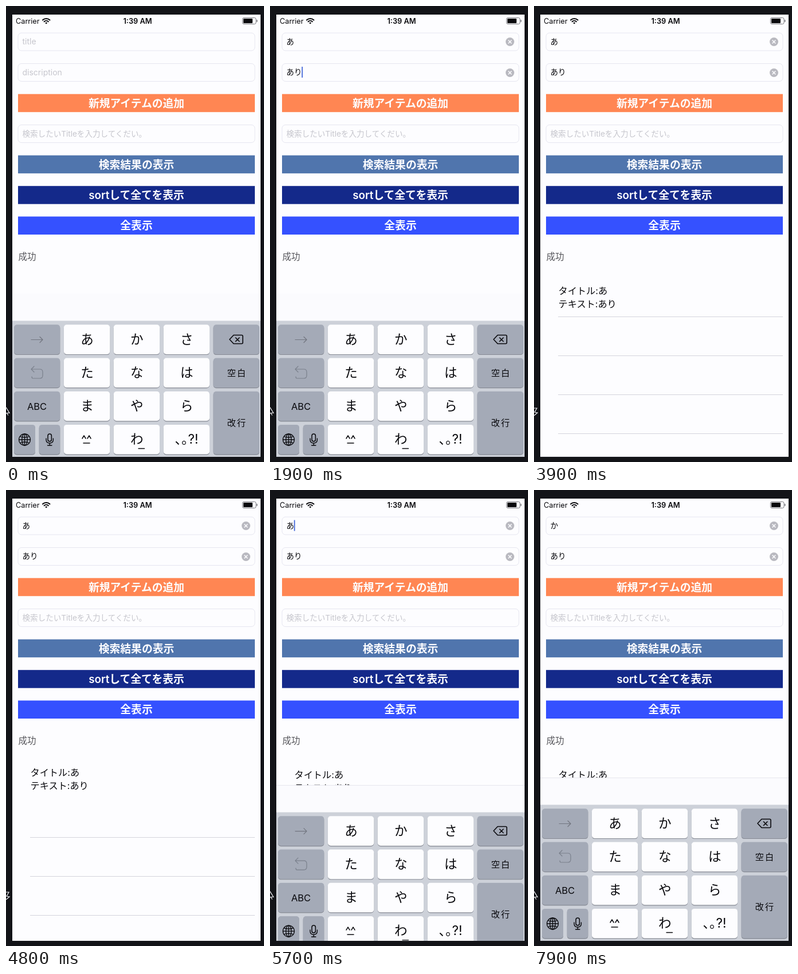
Animation of 450x796 px, one loop 8 s. Source, as an HTML page:

```html
<!DOCTYPE html>
<html lang="ja">
<head>
<meta charset="utf-8">
<style>
html, body { margin: 0; width: 100%; height: 100%; overflow: hidden; background: #131418; }
svg { display: block; width: 100vw; height: 100vh; }
text { font-family: Inter, "Noto Sans CJK JP", "Noto Sans CJK", sans-serif; white-space: pre; }
</style>
</head>
<body>
<svg id="stage" viewBox="0 0 450 796"></svg>
<script>
const INK = '#08080c', PAPER = '#fdfdff', HINT = '#c6c6cd';

// Text is placed by the middle of its capital height.
const text = (x, cy, size, str, attrs = '') =>
  `<text x="${x}" y="${cy + size * 0.37}" font-size="${size}" ${attrs}>${str}</text>`;
const mid = 'text-anchor="middle"';
const rect = (x, y, w, h, fill, attrs = '') =>
  `<rect x="${x}" y="${y}" width="${w}" height="${h}" fill="${fill}" ${attrs}/>`;
const line = (d, color = INK, width = 1.5) =>
  `<path d="${d}" fill="none" stroke="${color}" stroke-width="${width}" stroke-linecap="round" stroke-linejoin="round"/>`;

const field = y => rect(21, y, 413, 31, PAPER, 'rx="6" stroke="#e6e6f0"');
const button = (y, fill, label) =>
  rect(21, y, 413, 31.5, fill) +
  text(227.5, y + 16, 18.8, label, `${mid} fill="${PAPER}" font-weight="600"`);
const clearIcon = (id, y) =>
  `<g id="${id}"><circle cx="418.5" cy="${y}" r="7.5" fill="#b9b9c0"/>` +
  line(`M416 ${y - 2.5}l5 5m0-5l-5 5`, PAPER, 1.5) + '</g>';

function statusBar() {
  return text(17, 26.5, 12.7, 'Carrier') +
    text(229.5, 26.5, 12.8, '1:39 AM', `${mid} font-weight="600"`) +
    line('M64 24.5a9 9 0 0 1 12.4 0M66.6 27.2a5.2 5.2 0 0 1 7.2 0', INK, 2.1) +
    `<path d="M70.2 31.6l-2-2.2a3 3 0 0 1 4 0z"/>` +
    rect(412.5, 20.5, 23.5, 11, 'none', 'rx="2.5" stroke="#77777d"') +
    rect(414, 22, 16, 8, INK, 'rx="1"') +
    rect(437, 24, 1.5, 4, '#77777d', 'rx=".7"');
}

function table() {
  let rows = '';
  for (let i = 0; i < 4; i++)
    rows += `<path id="sep${i}" d="M42 ${542.5 + 68 * i}H434" stroke="#d4d4dc"/>`;
  return `<g id="table">${text(42.5, 497, 16.2, 'タイトル:あ')}${text(42.5, 520, 16.2, 'テキスト:あり')}${rows}</g>`;
}

const colX = c => 14 + 86.9 * c, rowY = r => 556.3 + 58.2 * r;
const key = (c, r, fill, w = 80.3, h = 51.6, dx = 0) =>
  rect(colX(c) + dx, rowY(r) + 1.2, w, h, '#868a94', 'rx="5"') +
  rect(colX(c) + dx, rowY(r), w, h, fill, 'rx="5"');

function keyboard() {
  const GRAY = '#a4aab7';
  let out = rect(11, 502, 433, 48, '#fbfbfe') +
    '<path id="barLine" d="M11 502.5H444" stroke="#e6e6ee"/>' +
    rect(11, 549.5, 433, 240, '#cdd1d9');
  [...'あかさたなはまや', 'ら', '', 'わ', '､｡?!'].forEach((label, i) => {
    const c = 1 + i % 3, r = Math.floor(i / 3);
    out += key(c, r, PAPER) +
      text(colX(c) + 40.5, rowY(r) + 25, 22.5, label, mid);
  });
  for (let r = 0; r < 3; r++) out += key(0, r, GRAY);
  out += key(0, 3, GRAY, 37) + key(0, 3, GRAY, 36.6, 51.6, 43.7);
  out += key(4, 0, GRAY) + key(4, 1, GRAY) + key(4, 2, GRAY, 80.3, 109.8);
  out += text(54, 698.5, 16.5, 'ABC', mid) +
    text(403, 640, 15.2, '空白', `${mid} letter-spacing="2"`) +
    text(403, 727.5, 15.2, '改行', `${mid} letter-spacing="2"`);
  out += line('M44 582.5H64m-5-5l5 5-5 5', '#727680', 1.2);
  out += line('M49 629l-5 5 5 5M44 634H59q5 0 5 5v6q0 5-5 5H47q-2 0-2-3', '#7a808c', 1.2);
  out += line('M397 574.5H411q2 0 2 2v11q0 2-2 2H397l-7-7.5zM400.5 579l6.5 6.5m0-6.5l-6.5 6.5', INK, 1.6);
  out += line('M133 755l3-5 3 5m3 0l3-5 3 5M135 763h11', INK, 1.5);
  out += line('M231 772.5h10.5', INK, 1.3);
  out += `<g fill="none" stroke="${INK}" stroke-width="1.3"><circle cx="32.5" cy="757" r="10"/>` +
    '<ellipse cx="32.5" cy="757" rx="4.8" ry="10"/>' +
    '<path d="M32.5 747v20M22.5 757h20M24.3 751.5q8.2 3 16.4 0M24.3 762.5q8.2-3 16.4 0"/></g>';
  out += rect(73, 747, 6.4, 13, 'none', `rx="3.2" stroke="${INK}" stroke-width="1.5"`) +
    line('M70 755v2q0 6 6.2 6t6.2-6v-2M76.2 763v4M72.5 767h7.4', INK, 1.4);
  return `<g id="keyboard">${out}</g>`;
}

document.getElementById('stage').innerHTML =
  '<clipPath id="screen"><path d="M11 15H444V787H11z"/></clipPath>' +
  rect(0, 0, 450, 796, '#131418') +
  `<g clip-path="url(#screen)" fill="${INK}">` +
  rect(11, 15, 433, 772, PAPER) + statusBar() +
  field(47) + field(100.5) + field(207.5) +
  text(28.5, 62, 14, 'title', `id="titleHint" fill="${HINT}"`) +
  text(28.5, 115.5, 14, 'discription', `id="descHint" fill="${HINT}"`) +
  text(28.5, 222.5, 13.55, '検索したいTitleを入力してくだい。', `fill="${HINT}"`) +
  text(28.5, 62, 13.5, '', 'id="title"') + text(28.5, 115.5, 13.5, '', 'id="desc"') +
  clearIcon('titleClear', 62.5) + clearIcon('descClear', 116.5) +
  rect(0, 0, 1.8, 19, '#4468d8', 'id="caret"') +
  button(153.7, '#ff8653', '新規アイテムの追加') +
  button(260.7, '#5075ad', '検索結果の表示') +
  button(314.2, '#14298a', 'sortして全てを表示') +
  button(367.5, '#3551ff', '全表示') +
  text(21.5, 437, 15.5, '成功', 'fill="#55555a"') +
  table() + keyboard() + '</g>' +
  '<path id="pointer" fill="none" stroke="#f4f4f8" stroke-width="1.2"/>';

const $ = id => document.getElementById(id);
const show = (id, on) => $(id).setAttribute('visibility', on ? 'visible' : 'hidden');
const clamp = v => Math.max(0, Math.min(1, v));

// The new row is listed as the keyboard starts to leave.
const HIDE = 3450, RAISE = 5435;

// Input history: time, title, description, focused field.
const edits = [
  [-800, '', '', 'title'],
  [600, 'あ', '', 'title'],
  [1000, 'あ', '', 'desc'],
  [1300, 'あ', 'あ', 'desc'],
  [1600, 'あ', 'あり', 'desc'],
  [HIDE, 'あ', 'あり', ''],
  [RAISE, 'あ', 'あり', 'title'],
  [6700, '', 'あり', 'title'],
  [7100, 'か', 'あり', 'title']
];

// Critically damped spring, from 1 down to 0.
function settle(ms) {
  const x = Math.max(0, ms) * 0.0183;
  return (1 + x) * Math.exp(-x);
}

function blink(ms) {
  const p = ms % 1000;
  return p < 900 ? clamp((750 - p) / 150) : (p - 900) / 100;
}

function draw(t) {
  const [since, title, desc, focus] = edits.filter(e => e[0] <= t).pop();
  const values = { title, desc };
  for (const id in values) {
    $(id).textContent = values[id];
    show(id + 'Hint', !values[id]);
    show(id + 'Clear', values[id]);
  }

  const caret = $('caret');
  caret.setAttribute('opacity', focus ? blink(t - since) : 0);
  if (focus) {
    caret.setAttribute('x', 28.3 + 13.5 * values[focus].length);
    caret.setAttribute('y', focus === 'title' ? 52.5 : 106);
  }

  const lowered = t < RAISE ? 1 - settle(t - HIDE) : settle(t - RAISE);
  $('keyboard').setAttribute('transform', `translate(0 ${285 * lowered})`);

  const listed = t >= HIDE, dragged = t >= 4600 && t < 5200;
  show('table', listed);
  show('barLine', listed);
  show('sep0', listed && !dragged);
  const shift = -4 * clamp((t - 4600) / 200) * clamp((5200 - t) / 200);
  $('table').setAttribute('transform', `translate(0 ${shift})`);

  $('pointer').setAttribute('d', listed && t < RAISE
    ? 'M0 702H5L1 709 6 710 0 715' : 'M0 700.5L6 710.5H1L4 714.5');
}

function frame() {
  draw(Math.floor(performance.now() % 8000 / 100) * 100);
  requestAnimationFrame(frame);
}
frame();
</script>
</body>
</html>
```
